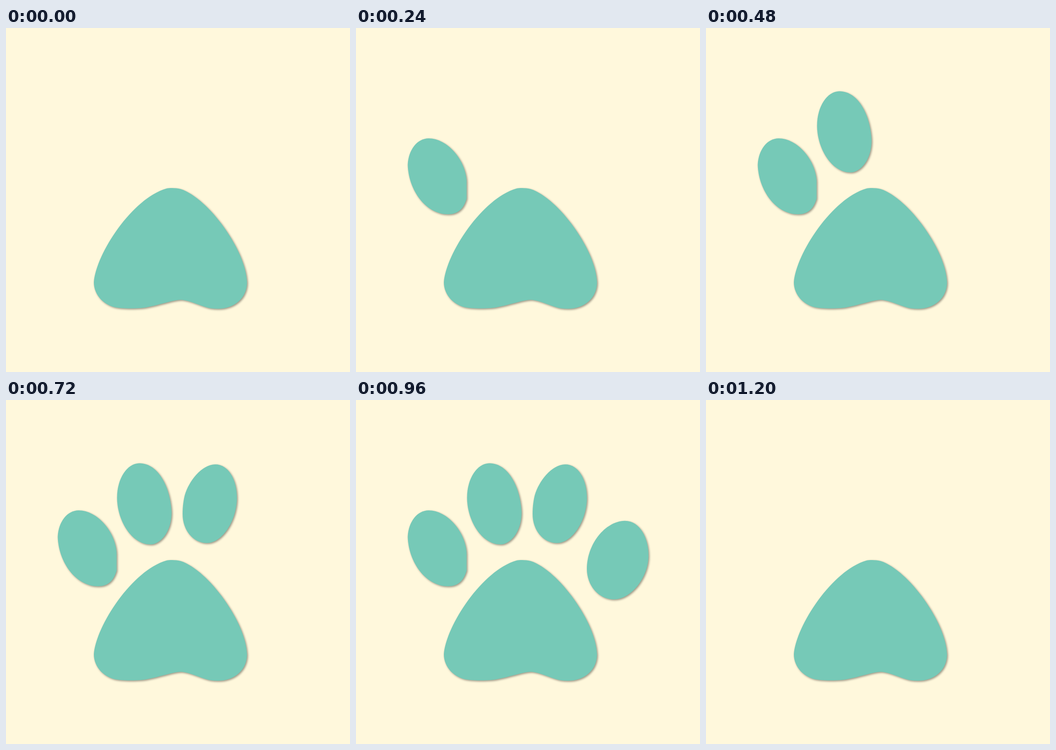
Animation of 748 by 748 pixels, one loop 1.24 s. Source, as an HTML page with a canvas:

```html
<!DOCTYPE html>
<html lang="en">
<head>
<meta charset="utf-8">
<title>Paw</title>
<style>
  html, body { margin: 0; width: 100%; height: 100%; overflow: hidden; background: #fff8dc; }
  canvas { display: block; width: 748px; height: 748px; }
</style>
</head>
<body>
<canvas id="stage" width="748" height="748"></canvas>
<script>
const SIZE = 748, STEP = 240, LOOP = 1240, TOES = 4;
const ctx = document.getElementById('stage').getContext('2d');

const pad = new Path2D(`M349 349 C356 347.6 371 347.6 380 350.3
  C440 370 523 485 524 553 C524 587 497 610.5 461 610.5
  Q452 610.5 445 609.5 C425 606 400 592 380 591
  C362 591 320 607 293 609 C280 610 262 610 250 609
  C213 607 191 580 191 553 C196 490 275 370 349 349Z`);

const toes = [
  `M158 240 C198 240 238 286 240.5 333 V371 C234 393 222 405 200 405
   C152 405 114 353 112.5 297 C114 265 133 240 158 240Z`,
  `M290 137.5 C332 137.5 358 192 360 245 C360 285 337 314 314 314
   C273 314 241.5 262 241.5 212 C241.5 170 264 137.5 290 137.5Z`,
  `M455 140 C483 140 502 172 502 213 C502 262 470 311 437 311
   C406 311 384 282 384 248 C384 232 386 217 389 206 C397 178 425 140 455 140Z`,
  `M584 262.7 C617 262 636 300 636 338 C636 387 597 433.5 561 433.5
   C527 433.5 502 403 502 367 C502 314 541 264 584 262.7Z`
].map(d => new Path2D(d));

function fillShape(path) {
  ctx.save();
  ctx.fillStyle = '#76c9b7';
  ctx.shadowColor = 'rgba(0, 0, 0, 0.4)';
  ctx.shadowBlur = 4;
  ctx.shadowOffsetX = ctx.shadowOffsetY = 2;
  ctx.fill(path);
  ctx.restore();
}

function draw(now) {
  // Toes appear one per step, then all vanish just before the loop ends.
  const count = Math.floor((now % LOOP) / STEP) % (TOES + 1);
  ctx.fillStyle = '#fff8dc';
  ctx.fillRect(0, 0, SIZE, SIZE);
  [pad, ...toes.slice(0, count)].forEach(fillShape);
}

const start = performance.now();
function tick() {
  draw(performance.now() - start);
  requestAnimationFrame(tick);
}
tick();
</script>
</body>
</html>
```
